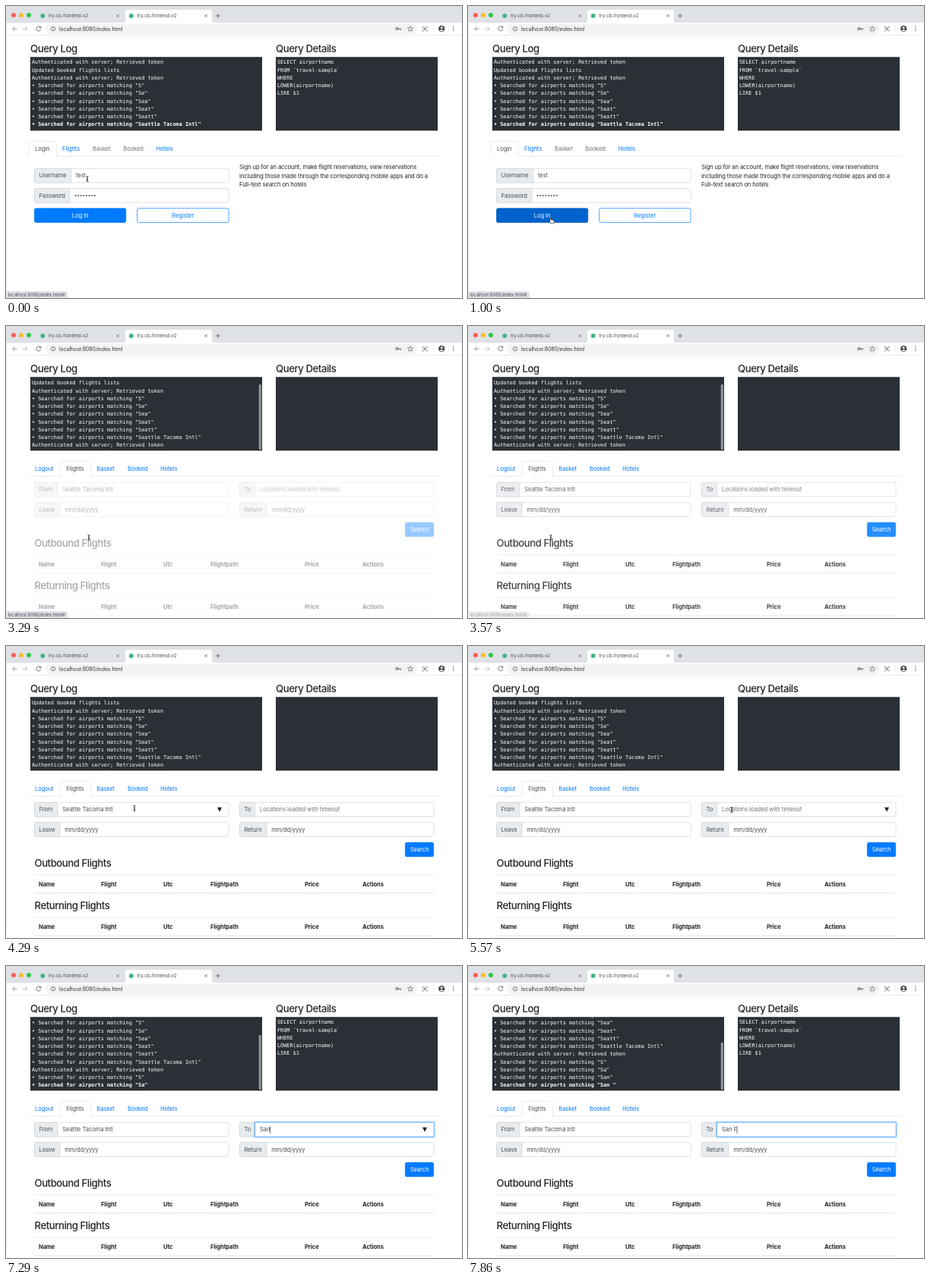
Animation, 600 px wide and 385 px high, one loop 8 s. Source, as an HTML page:

```html
<!DOCTYPE html>
<html lang="en">
<head>
<meta charset="utf-8">
<title>Flight booking</title>
<style>
  html, body { margin: 0; width: 100%; height: 100%; overflow: hidden; background: #fff; }
  svg { display: block; width: 600px; height: 385px; }
  text { font: 7.6px Inter, Roboto, sans-serif; letter-spacing: -.012em; white-space: pre; fill: #212529; }
  .tab { font-size: 5.95px; fill: #45494d; }
  .url { font-size: 6.95px; fill: #303336; }
  .heading { font-size: 13.2px; font-weight: 500; letter-spacing: -.035em; }
  .mono { font: 6.85px "DejaVu Sans Mono", monospace; letter-spacing: 0; fill: #fff; }
  .bold { font-weight: 700; }
  .link { fill: #007bff; }
  .muted { fill: #6c757d; }
  .input { fill: #495057; }
  .white { fill: #fff; }
  .mid { text-anchor: middle; }
  .icon { fill: none; stroke: #5f6368; stroke-width: .9; }
</style>
</head>
<body>
<svg id="stage" viewBox="0 0 600 385" xmlns="http://www.w3.org/2000/svg"></svg>
<script>
const LOOP = 8000, TICK = 1000 / 7;
const LINE = 10.25, VISIBLE_LINES = 9;

const text = (x, y, s, cls = '', extra = '') => `<text x="${x}" y="${y}" class="${cls}" ${extra}>${s}</text>`;
const rect = (x, y, w, h, fill, extra = '') =>
  `<rect x="${x}" y="${y}" width="${w}" height="${h}" fill="${fill}" ${extra}/>`;
const path = (d, extra = 'class="icon"') => `<path d="${d}" ${extra}/>`;
const dot = (x, y, r, fill) => `<circle cx="${x}" cy="${y}" r="${r}" fill="${fill}"/>`;
const group = (id, ...parts) => `<g id="${id}">${parts.join('')}</g>`;
const rule = (x1, x2, y, width) => path(`M${x1} ${y}H${x2}`, `stroke="#dee2e6" stroke-width="${width}"`);

const BORDER = 'rx="2" stroke="#ced4da" stroke-width=".7"';
function field(x, y, split, label, value, cls = 'input') {
  return rect(x, y, 255.5, 18.6, '#fff', BORDER) +
    path(`M${split} ${y}H${x + 2}q-2 0-2 2v14.6q0 2 2 2H${split}z`,
      'fill="#e9ecef" stroke="#ced4da" stroke-width=".7"') +
    text(x + 6, y + 12.1, label, 'input') + text(split + 6.2, y + 12.1, value, cls);
}

const button = (id, x, y, w, label, fill, cls) =>
  rect(x, y, w, 18.6, fill, `id="${id}" rx="2" stroke="#007bff" stroke-width=".7"`) +
  text(x + w / 2, y + 12.1, label, `mid ${cls}`);

const down = (id, x) => path(`M${x - 3} 212.8h6l-3 6z`, `id="${id}" fill="#222"`);

function tabs(id, left, right, items) {
  return group(id, rule(30, left, 198.3, .7), rule(right, 570, 198.3, .7),
    path(`M${left} 198.3V180.5q0-2 2-2H${right - 2}q2 0 2 2V198.3`,
      'fill="#fff" stroke="#dee2e6" stroke-width=".7"'),
    ...items.map(([x, label, cls]) => text(x, 191, label, cls)));
}

function flightTable(y, title) {
  const columns = { Name: 43, Flight: 125, Utc: 207, Flightpath: 269, Price: 393, Actions: 469 };
  return text(37.5, y, title, 'heading') + rule(37.5, 563, y + 10.6, .7) +
    Object.entries(columns).map(([name, x]) => text(x, y + 25.6, name, 'bold')).join('') +
    rule(37.5, 563, y + 34.8, 1);
}

function browserTab(x, closeX) {
  return dot(x, 13, 3, '#41b883') + text(x + 7.7, 15.2, 'try-cb-frontend-v2', 'tab') +
    path(`M${closeX - 1.8} 11.2l3.6 3.6m0-3.6l-3.6 3.6`, 'class="icon" style="stroke-width:.7"');
}

const browser = group('browser',
  rect(0, 0, 600, 22, '#dee1e6'),
  dot(10, 12, 3, '#ff5f57'), dot(20, 12, 3, '#febc2e'), dot(30, 12, 3, '#28c840'),
  path('M154 22q3 0 3-3V8q0-3 3-3H268q3 0 3 3V19q0 3 3 3z', 'fill="#fff"'),
  browserTab(48.3, 147), browserTab(164.8, 263),
  path('M276.2 13h5.6m-2.8-2.8v5.6'),
  rule(0, 600, 38.7, .8),
  rect(52, 23.5, 489, 13.4, '#f1f3f4', 'rx="6.7"'),
  path('M15 30H9m2.7-2.8L9 30l2.7 2.8', 'class="icon" opacity=".65"'),
  path('M22 30h6m-2.7-2.8L28 30l-2.7 2.8', 'class="icon" opacity=".4"'),
  path('M45.3 28a3 3 0 1 0 .6 2.4M45.9 26.6v2h-2'),
  '<circle cx="62" cy="30" r="2.8" class="icon" style="stroke-width:.7"/>',
  path('M62 29.7v2m0-3.4v.7', 'class="icon" style="stroke-width:.7"'),
  text(70, 32.5, 'localhost:8080/index.html', 'url'),
  '<circle cx="514.5" cy="30" r="1.5" class="icon" style="stroke-width:1.1"/>',
  path('M516 30h3.8m-1 0v1.8', 'class="icon" style="stroke-width:1.1"'),
  path('M532 26.5l1 2.3 2.5.2-1.9 1.7.6 2.5-2.2-1.3-2.2 1.3.6-2.5-1.9-1.7 2.5-.2z', 'class="icon" style="stroke-width:.7"'),
  path('M548 28.5V27h1.8m2.8 0h1.8v1.5m0 3V33h-1.8m-2.8 0H548v-1.5', 'class="icon" opacity=".7"'),
  rect(549.3, 28.3, 3.8, 3.4, '#9a9da1'),
  rule(562, 562.6, 30, 9),
  dot(573.2, 30, 4.2, '#4a4e52'), dot(573.2, 28.7, 1.4, '#fff'),
  path('M570.6 32.5q2.6-2.6 5.2 0q-2.6 1.8-5.2 0z', 'fill="#fff"'),
  ...[27.5, 30, 32.5].map(y => dot(588.8, y, .75, '#5f6368')));

const queries = group('queries',
  text(32, 60.5, 'Query Log', 'heading'), text(355, 60.5, 'Query Details', 'heading'),
  rect(32, 67.2, 305, 97.2, '#2a3036'), rect(355, 67.2, 213, 97.2, '#2a3036'),
  '<clipPath id="logClip"><rect x="32" y="67.2" width="305" height="97.2"/></clipPath>',
  '<g clip-path="url(#logClip)"><g id="log"></g></g>',
  rect(332.7, 0, 3.2, 0, '#92969a', 'id="thumb" rx="1.6"'),
  group('details', ...['SELECT airportname', 'FROM `travel-sample`', 'WHERE', 'LOWER(airportname)', 'LIKE $1']
    .map((s, i) => text(357, 76.4 + i * LINE, s, 'mono'))));

const login = group('login',
  tabs('guestTabs', 30, 66.3, [[38, 'Login', 'input'], [74, 'Flights', 'link'], [114, 'Basket', 'muted'],
    [154.3, 'Booked', 'muted'], [197.7, 'Hotels', 'link']]),
  field(37.5, 214.3, 85.8, 'Username', 'test'),
  field(37.5, 240.5, 84, 'Password', ''),
  ...Array.from({ length: 8 }, (_, i) => dot(91.5 + i * 3.62, 250, 1.05, '#495057')),
  button('submit', 37.5, 266.8, 120.3, 'Log In', '#007bff', 'white'),
  button('register', 172.7, 266.8, 120.3, 'Register', '#fff', 'link'),
  ...['Sign up for an account, make flight reservations, view reservations',
    'including those made through the corresponding mobile apps and do a',
    'Full-text search on hotels'].map((s, i) => text(307, 214.8 + i * 11.75, s)));

const flights = group('flights',
  tabs('userTabs', 71.3, 111.3, [[38, 'Logout', 'link'], [79.3, 'Flights', 'input'], [119.3, 'Basket', 'link'],
    [160, 'Booked', 'link'], [203, 'Hotels', 'link']]),
  group('search',
    field(37.5, 206.3, 68, 'From', 'Seattle Tacoma Intl'),
    field(307.5, 206.3, 327.8, 'To', ''),
    rect(327.8, 206.3, 235.2, 18.6, '#fff', 'id="focus" stroke="#80bdff" stroke-width=".8"'),
    rect(326.8, 205.3, 237.2, 20.6, 'none', 'id="ring" rx="2" stroke="#007bff" stroke-opacity=".3" stroke-width="1.7"'),
    text(334, 218.4, '', '', 'id="to"'),
    path('M0 211.4v9.2', 'id="caret" stroke="#222" stroke-width=".7"'),
    down('fromArrow', 281), down('toArrow', 551),
    field(37.5, 232.7, 71, 'Leave', 'mm/dd/yyyy'),
    field(307.5, 232.7, 343, 'Return', 'mm/dd/yyyy'),
    button('find', 525.3, 259.1, 37.4, 'Search', '#007bff', 'white'),
    flightTable(291, 'Outbound Flights'), flightTable(347.4, 'Returning Flights')));

const status = group('status',
  path('M0 376H78q3 0 3 3V385H0z', 'fill="#dee1e6"'),
  text(2.5, 382.8, 'localhost:8080/index.html#', 'tab'));

const pointer = group('pointer',
  path('M-1.6-3.7q1.6 0 1.6 1.2V2.5q0 1.2-1.6 1.2M1.6-3.7Q0-3.7 0-2.5V2.5Q0 3.7 1.6 3.7M-.9.9H.9',
    'id="beam" fill="none" stroke="#333" stroke-width=".8"'),
  path('M-.9.3q.8-.9 1.5 0V3q1-.6 1.4.2q.9-.5 1.3.3q1-.2 1.1.7V6q-.2 1-.8 1.9H0Q-.8 6.3-2.4 4.6q.3-1 1.5 0z',
    'id="hand" fill="#fff" stroke="#222" stroke-width=".7" stroke-linejoin="round"'));

const stage = document.getElementById('stage');
stage.innerHTML = rect(0, 0, 600, 385, '#fff') + browser + queries + login + flights + status +
  path('M.2 22V376', 'stroke="#c8cacd" stroke-width=".5"') + pointer;
const el = Object.fromEntries([...stage.querySelectorAll('[id]')].map(node => [node.id, node]));

const matching = s => `• Searched for airports matching "${s}"`;
const TOKEN = 'Authenticated with server; Retrieved token';
const LOG = [TOKEN, 'Updated booked flights lists', TOKEN,
  ...['S', 'Se', 'Sea', 'Seat', 'Seatt', 'Seattle Tacoma Intl'].map(matching),
  TOKEN, ...['S', 'Sa', 'San', 'San '].map(matching)];

// Tracks list [tick, value...]; a tick is a seventh of a second.
const LOGGED_IN = 23, FOCUSED = 40, TYPING = 46;
const logCount = [[0, 9], [LOGGED_IN, 10], [49, 11], [51, 12], [52, 13], [54, 14]];
const typed = [[0, ''], [47, 'S'], [49, 'Sa'], [50, 'San'], [52, 'San '], [54, 'San F']];
const caretOn = [[0, 0], [FOCUSED, 1], [43, 0], [TYPING, 1]];
const thumbAlpha = [[0, 0], [22, 0], [23, 1], [25, 1], [27, 0], [48, 0], [49, 1]];
const formAlpha = [[23, .4], [24, .62], [25, .85], [26, 1]];
const statusAlpha = [[0, 1], [24, 1], [26, 0]];
const mouse = [[0, 107, 228], [1, 107, 231], [3, 108, 248], [5, 109, 270], [7, 109, 279], [27, 109, 279],
  [28, 124, 263], [29, 148, 234], [30, 169, 214], [32, 205, 214], [34, 230, 215], [36, 300, 216], [38, 347, 216]];

const hold = (track, k) => track.filter(step => step[0] <= k).pop()[1];
function glide(track, k) {
  const next = track.findIndex(step => step[0] > k);
  if (next < 1) return track.at(next).slice(1);
  const a = track[next - 1], b = track[next], p = (k - a[0]) / (b[0] - a[0]);
  return a.slice(1).map((v, i) => v + (b[i + 1] - v) * p);
}
const show = (node, on) => { node.style.display = on ? '' : 'none'; };

function drawLog(count, alpha) {
  const searched = LOG[count - 1].startsWith('•');
  const first = count > VISIBLE_LINES ? 159.4 - (count - 1) * LINE : 76.4;
  el.log.innerHTML = LOG.slice(0, count).map((s, i) =>
    text(34, first + i * LINE, s, searched && i === count - 1 ? 'mono bold' : 'mono')).join('');
  show(el.details, searched);
  const height = 95 * 97 / (count * LINE + 4);
  el.thumb.setAttribute('height', height);
  el.thumb.setAttribute('y', 163.2 - height);
  el.thumb.style.opacity = alpha;
}

function draw(k) {
  const [x, y] = glide(mouse, k);
  const loggedIn = k >= LOGGED_IN, focused = k >= FOCUSED;
  const overButton = !loggedIn && y >= 267;
  const overRow = loggedIn && y > 206 && y < 225;

  drawLog(hold(logCount, k), glide(thumbAlpha, k)[0]);
  show(el.login, !loggedIn);
  show(el.flights, loggedIn);
  el.search.style.opacity = glide(formAlpha, Math.max(k, LOGGED_IN))[0];
  el.status.style.opacity = glide(statusAlpha, k)[0];
  el.submit.setAttribute('fill', overButton ? '#0062cc' : '#007bff');
  el.submit.setAttribute('stroke', overButton ? '#005cbf' : '#007bff');

  const value = hold(typed, k);
  el.to.textContent = value || 'Locations loaded with timeout';
  el.to.setAttribute('class', value ? 'input' : 'muted');
  show(el.focus, focused);
  show(el.ring, focused);
  show(el.caret, hold(caretOn, k));
  const caretX = 334.2 + (value ? el.to.getComputedTextLength() : 0);
  el.caret.setAttribute('transform', `translate(${caretX} 0)`);
  show(el.fromArrow, overRow && x > 68 && x < 293);
  show(el.toArrow, overRow && x > 328 && k < 54);

  el.pointer.setAttribute('transform', `translate(${x} ${y})`);
  show(el.pointer, k < TYPING);
  show(el.hand, overButton);
  show(el.beam, !overButton);
}

const start = performance.now();
let shown = -1;
function loop() {
  const t = (performance.now() - start) % LOOP;
  const k = Math.floor((t + 4) / TICK) % 56;
  if (k !== shown) draw(shown = k);
  requestAnimationFrame(loop);
}
loop();
</script>
</body>
</html>
```
